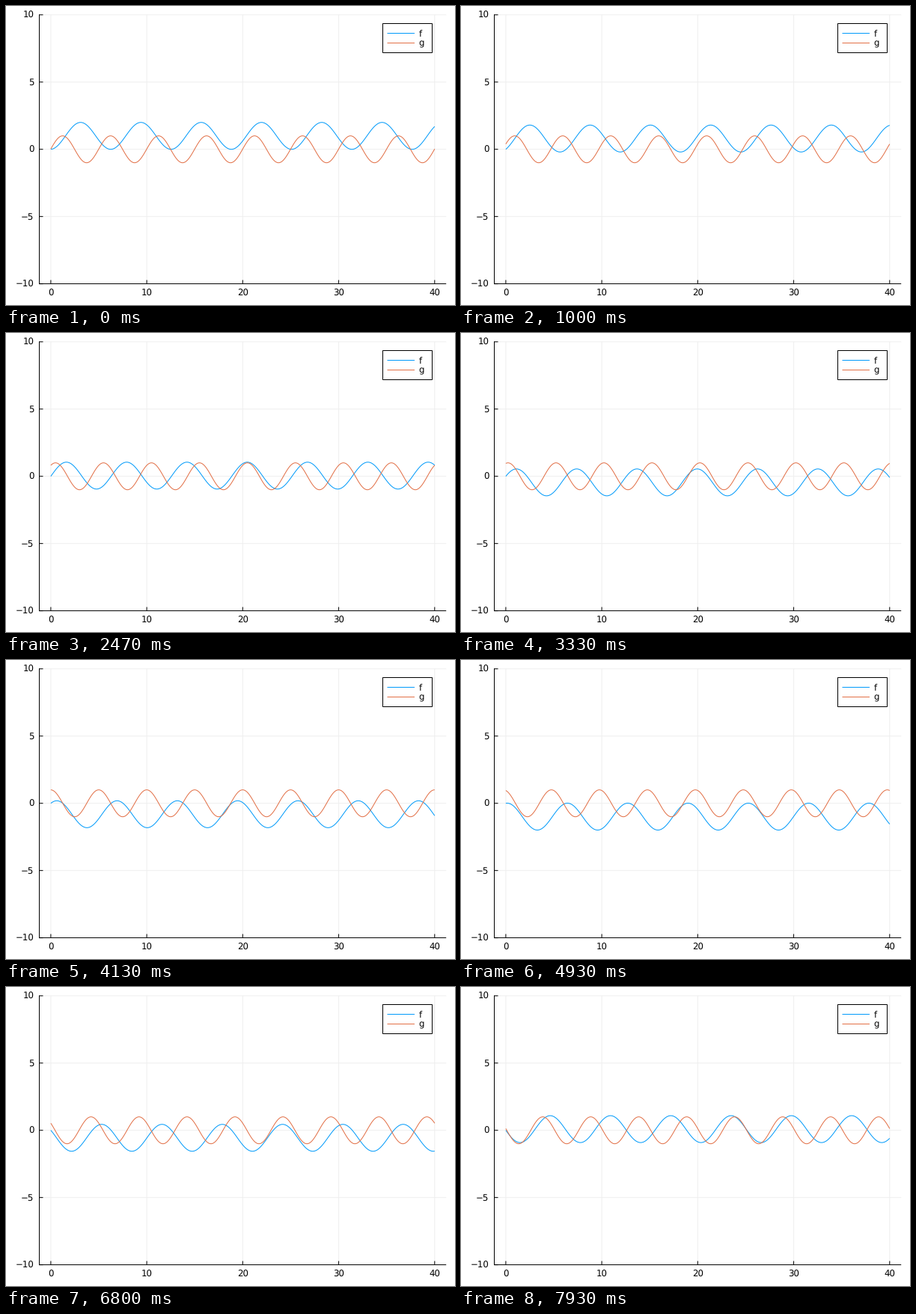
Recreate the animation shown at these times as a matplotlib script. Size 600x400 px, loop 8000 ms.

```python
import numpy as np
import matplotlib.pyplot as plt
from matplotlib.animation import FuncAnimation
from matplotlib.patches import Rectangle

W, H, DPI = 600, 400, 100
STEPS, LOOP_MS = 120, 8000
SUB = 3  # animation frames per step of the waves
PX = 72 / DPI  # one pixel in points
BLUE, ORANGE, GRID = "#009afa", "#e26f46", "#efefef"
LEFT, RIGHT, TOP, BOTTOM = 44.5, 588.2, 11.8, 371.6

plt.rcParams.update({
    "font.family": "DejaVu Sans",
    "font.size": 8.5,
    "text.hinting": "none",
    "path.simplify": False,
    "path.snap": False,
})

fig = plt.figure(figsize=(W / DPI, H / DPI), dpi=DPI, facecolor="white")

# Plot area in data units
ax = fig.add_axes([LEFT / W, 1 - BOTTOM / H, (RIGHT - LEFT) / W, (BOTTOM - TOP) / H])
ax.set_xlim(-1.2, 41.2)
ax.set_ylim(-10, 10)
ax.axis("off")

# Layer in pixel units for axes, labels and legend
deco = fig.add_axes([0, 0, 1, 1], zorder=-1)
deco.set_xlim(0, W)
deco.set_ylim(H, 0)
deco.axis("off")


def stroke(xs, ys, color="black", z=2):
    deco.plot(xs, ys, color=color, lw=PX, zorder=z, solid_capstyle="butt")


def label(x, y, text, align):
    deco.text(x, y, text, ha=align, va="baseline", color="black", zorder=5)


def px_x(v):
    return LEFT + (v + 1.2) / 42.4 * (RIGHT - LEFT)


def px_y(v):
    return BOTTOM - (v + 10) / 20 * (BOTTOM - TOP)


def number(v):
    return str(v).replace("-", "\u2212")


for v in range(0, 41, 10):
    x = px_x(v)
    stroke([x, x], [TOP, BOTTOM], GRID, z=1)
    stroke([x, x], [BOTTOM, BOTTOM - 5])
    label(x, 387.5, number(v), "center")

for v in range(-10, 11, 5):
    y = px_y(v)
    stroke([LEFT, RIGHT], [y, y], GRID, z=1)
    stroke([LEFT, LEFT + 5], [y, y])
    label(37.5, y + 4.3, number(v), "right")

stroke([LEFT, LEFT], [TOP - 0.5, BOTTOM + 0.5])
stroke([LEFT, RIGHT], [BOTTOM, BOTTOM])

# Legend
deco.add_patch(Rectangle((503.5, 23.5), 66, 39, fc="white", ec="black",
                         lw=PX, zorder=3))
for y, name, color in ((36.5, "f", BLUE), (49.5, "g", ORANGE)):
    stroke([509.5, 546], [y, y], color, z=4)
    label(551.7, y + 4.1, name, "left")

# Two travelling waves
x = np.linspace(0, 40, 801)
f_line, = ax.plot([], [], color=BLUE, lw=PX, solid_capstyle="butt")
g_line, = ax.plot([], [], color=ORANGE, lw=PX, solid_capstyle="butt")


def draw(i):
    step = min((i + 1) // SUB, STEPS - 1)
    t = 0.02 * (step + 1)
    f_line.set_data(x, np.cos(2 * t) - np.cos(x + 2 * t))
    g_line.set_data(x, np.sin(2 * np.pi * (x + t) / 5))
    return f_line, g_line


anim = FuncAnimation(fig, draw, frames=STEPS * SUB,
                     interval=LOOP_MS / (STEPS * SUB),
                     repeat=True, repeat_delay=0, blit=False)
plt.show()
```
